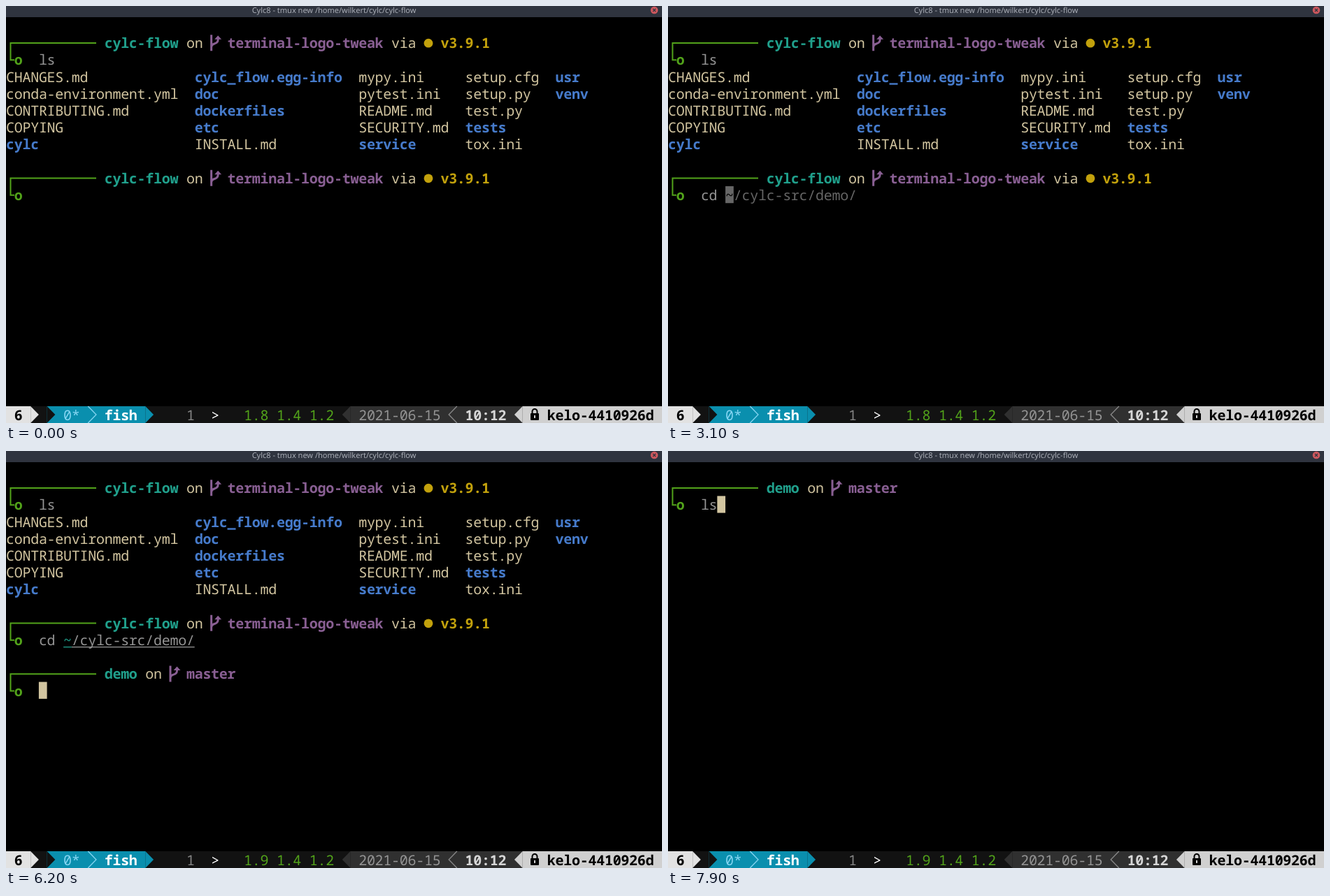
Recreate the animation shown at these times as an HTML page. Size 938 by 597 pixels, loop 8 s.

```html
<!DOCTYPE html>
<html lang="en">
<head>
<meta charset="utf-8">
<title>Terminal</title>
<style>
  html, body { margin: 0; width: 100%; height: 100%; overflow: hidden; background: #000; }
  svg { display: block; width: 938px; height: 597px; }
  text {
    font: 20px "Noto Sans Mono", monospace;
    letter-spacing: -0.275px;
    text-rendering: geometricPrecision;
    white-space: pre;
  }
  .b { font-weight: 700; }
  .title { font: 11px "Noto Sans", sans-serif; letter-spacing: 0; text-anchor: middle; }
</style>
</head>
<body>
<svg id="stage" viewBox="0 0 938 597"></svg>
<script>
const CELL = 11.725, ROW = 24.2, TOP = 16, LOOP = 8000;
const TAN = '#d2c5a0', GREY = '#949494', GHOST = '#666', GREEN = '#52a31a', TEAL = '#20a08c',
      PURPLE = '#895f93', YELLOW = '#c2a10c', BLUE = '#467bcb', RED = '#cc2a2a';
const stage = document.getElementById('stage');
const timed = [];
let parent = stage;

const X = col => col * CELL;
const Y = row => TOP + row * ROW;

function add(tag, attrs, content) {
  const el = document.createElementNS('http://www.w3.org/2000/svg', tag);
  for (const key in attrs) el.setAttribute(key, attrs[key]);
  if (content) el.textContent = content;
  return parent.appendChild(el);
}

const rect = (x, y, width, height, fill) => add('rect', { x, y, width, height, fill });
const shape = (d, fill) => add('path', { d, fill });
const line = (d, stroke, width) => add('path', { d, stroke, 'stroke-width': width, fill: 'none' });

function type(col, row, str, fill, bold) {
  return add('text', { x: X(col), y: Y(row) + 19.9, fill, class: bold ? 'b' : '' }, str);
}

// Draws a group that is visible only in the [from, to) spans.
function during(spans, draw) {
  const outer = parent;
  parent = add('g', { display: 'none' });
  timed.push({ el: parent, spans });
  draw();
  parent = outer;
}

const block = (col, row, fill = TAN) => rect(X(col), Y(row), CELL, ROW, fill);
const cursor = (col, row, ...spans) => during(spans, () => block(col, row));

function branch(col, row) {
  const x = X(col) - 1, y = Y(row) + 1;
  line(`M${x + 1.5} ${y}v23 M${x + 1.5} ${y + 18}q0-4 5-5.500q4.500-1.500 4.500-5.500v-3`, PURPLE, 3);
  shape(`M${x + 6} ${y + 6.5}l5-5.500l5 5.500z`, PURPLE);
}

function prompt(row, dir, branchName, version) {
  const y = Y(row) + 12.8;
  line(`M129 ${y}H6.500V${y + ROW}H12`, GREEN, 2);
  type(1, row + 1, 'o', GREEN, true);
  let col = 12;
  type(col, row, dir, TEAL, true);
  col += dir.length + 1;
  type(col, row, 'on', TAN);
  branch(col + 3, row);
  col += 5;
  type(col, row, branchName, PURPLE, true);
  if (!version) return;
  col += branchName.length + 1;
  type(col, row, 'via', TAN);
  add('circle', { cx: X(col + 4) + 6, cy: Y(row) + 13, r: 6.4, fill: YELLOW });
  type(col + 6, row, version, YELLOW, true);
}

function titleBar() {
  rect(0, 0, 938, 16, '#2f343f');
  add('text', { x: 469, y: 10, fill: '#a9adb6', class: 'title' },
    'Cylc8 - tmux new /home/wilkert/cylc/cylc-flow');
  add('circle', { cx: 927, cy: 6, r: 5.3, fill: '#cc575d' });
  line('M925 4l4 4m0-4l-4 4', '#2f343f', 1.2);
}

function listing() {
  const columns = [
    [0, 'CHANGES.md conda-environment.yml CONTRIBUTING.md COPYING cylc/'],
    [23, 'cylc_flow.egg-info/ doc/ dockerfiles/ etc/ INSTALL.md'],
    [43, 'mypy.ini pytest.ini README.md SECURITY.md service/'],
    [56, 'setup.cfg setup.py test.py tests/ tox.ini'],
    [67, 'usr/ venv/']
  ];
  for (const [col, names] of columns) {
    names.split(' ').forEach((name, i) => {
      const dir = name.endsWith('/');
      type(col, 3 + i, dir ? name.slice(0, -1) : name, dir ? BLUE : TAN, dir);
    });
  }
}

function statusBar() {
  const y = 573, h = 24, m = y + h / 2, row = 23;
  const right = (col, fill) => shape(`M${X(col)} ${y}L${X(col + 1)} ${m}L${X(col)} ${y + h}z`, fill);
  const left = (col, fill) => shape(`M${X(col + 1)} ${y}L${X(col)} ${m}L${X(col + 1)} ${y + h}z`, fill);
  const bar = (from, to, fill) => rect(X(from), y, X(to) - X(from), h, fill);
  bar(0, 80, '#121212');
  bar(0, 3, '#e2e2e2');
  right(3, '#e2e2e2');
  type(1, row, '6', '#000', true);
  bar(5, 17, '#0a8fae');
  right(5, '#121212');
  right(17, '#0a8fae');
  type(7, row, '0*', '#86d6f2');
  line(`M${X(10)} ${y}L${X(11)} ${m}L${X(10)} ${y + h}`, '#86d6f2', 1.3);
  type(12, row, 'fish', '#fff', true);
  type(22, row, '1', '#858585');
  type(25, row, '>', '#fff');
  during([[0, 3500]], () => type(29, row, '1.8', GREEN));
  during([[3500, LOOP]], () => type(29, row, '1.9', GREEN));
  type(33, row, '1.4', GREEN);
  type(37, row, '1.2', GREEN);
  left(41, '#303030');
  bar(42, 80, '#303030');
  type(43, row, '2021-06-15', '#949494');
  line(`M${X(55)} ${y}L${X(54)} ${m}L${X(55)} ${y + h}`, '#8a8a8a', 1.3);
  type(56, row, '10:12', '#d6d6d6', true);
  left(62, '#d0d0d0');
  bar(63, 80, '#d0d0d0');
  add('rect', { x: 750, y: 583, width: 12, height: 10, rx: 1, fill: '#000' });
  line('M752.500 584v-3.500a3.500 3.500 0 0 1 7 0v3.500', '#000', 2);
  rect(755, 586, 2, 4, '#d0d0d0');
  type(66, row, 'kelo-4410926d', '#000', true);
}

function session() {
  const path = '~/cylc-src/demo/';

  during([[0, 6400]], () => {
    prompt(1, 'cylc-flow', 'terminal-logo-tweak', 'v3.9.1');
    type(4, 2, 'ls', GREY);
    listing();
    prompt(9, 'cylc-flow', 'terminal-logo-tweak', 'v3.9.1');
  });

  cursor(4, 10, [400, 600], [1200, 1800], [2100, 2400]);
  during([[2400, 2600]], () => {
    type(4, 10, 'c', RED);
    block(5, 10, GHOST);
    type(5, 10, 'l', '#000');
    type(6, 10, 'ear', GHOST);
  });
  during([[2600, 6400]], () => type(4, 10, 'cd', GREY));
  cursor(6, 10, [2600, 3100]);
  during([[3100, 4300]], () => type(7, 10, path, GHOST));
  during([[3100, 3900]], () => {
    block(7, 10, GHOST);
    type(7, 10, '~', '#000');
  });
  during([[4300, 4400]], () => type(7, 10, path, GREY));
  during([[4400, 6400]], () => {
    type(7, 10, '~', TEAL);
    type(8, 10, path.slice(1), GREY);
    rect(X(7), 280, CELL, 1.3, TEAL);
    rect(X(8), 280, X(15), 1.3, GREY);
  });
  cursor(23, 10, [4300, 4600]);
  cursor(0, 11, [4600, 4900]);

  during([[4900, 6400]], () => prompt(12, 'demo', 'master'));
  cursor(4, 13, [4900, 5200], [5800, 6100], [6200, 6400]);
  during([[6100, 6200]], () => add('rect', {
    x: X(4), y: Y(13), width: CELL, height: ROW, fill: 'none', stroke: TAN
  }));

  during([[6400, LOOP]], () => prompt(1, 'demo', 'master'));
  cursor(4, 2, [6400, 6800]);
  during([[7100, 7200]], () => {
    type(4, 2, 'l', RED);
    block(5, 2, GHOST);
    type(5, 2, 's', '#000');
  });
  during([[7200, LOOP]], () => type(4, 2, 'ls', GREY));
  cursor(6, 2, [7200, 7800], [7900, LOOP]);
}

function render() {
  const t = performance.now() % LOOP;
  for (const { el, spans } of timed) {
    const on = spans.some(([from, to]) => t >= from && t < to);
    el.setAttribute('display', on ? 'inline' : 'none');
  }
  requestAnimationFrame(render);
}

titleBar();
session();
statusBar();
render();
</script>
</body>
</html>
```
